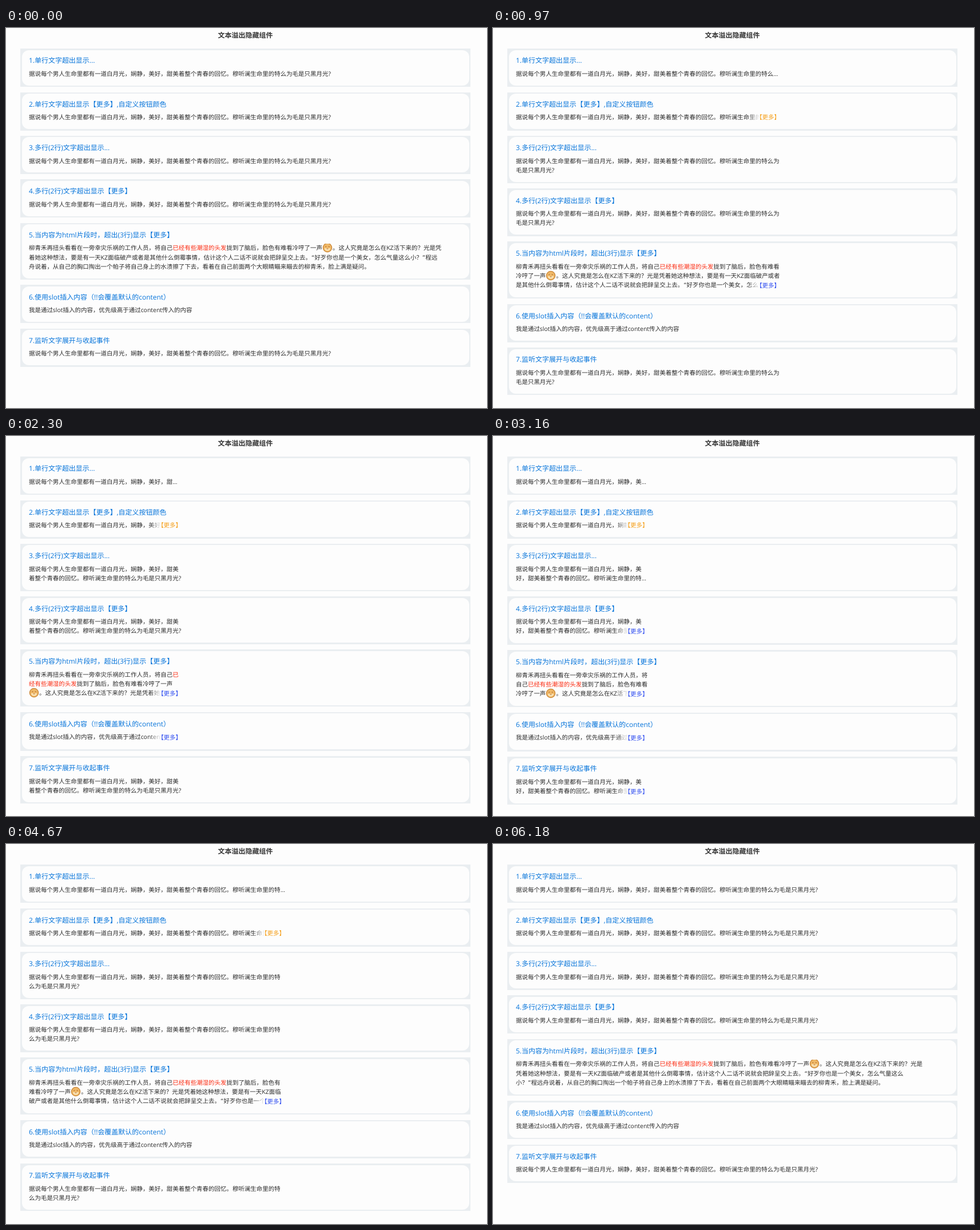
These frames come from a looping animation (841 px wide and 666 px high, 6.3 s). An HTML page:

```html
<!DOCTYPE html>
<html lang="zh-CN">
<head>
<meta charset="utf-8">
<title>文本溢出隐藏组件</title>
<style>
html, body { margin: 0; width: 100%; height: 100%; overflow: hidden; background: #fdfdfd; }
body {
  position: relative; color: #2c2c2c;
  font: 10.47px/16.2px "Open Sans", "Noto Sans CJK SC", "Noto Sans CJK", sans-serif;
  text-rendering: geometricPrecision; text-spacing-trim: space-all;
}
h1, h2, p { margin: 0; }
h1 { position: absolute; top: 4.6px; width: 837px; text-align: center; font-size: 12px; line-height: 16px; color: #333; }
main { position: absolute; left: 25px; top: 36.2px; width: 787px; }
section { padding: 2.5px; margin-bottom: 9.4px; background: #eaeef1; }
section > div { padding: 10.6px 12.5px 11.6px; border-radius: 12px; background: #fdfdfd; }
h2 { margin-bottom: 7.6px; font-size: 11.97px; font-weight: 400; line-height: 16px; color: #0674da; white-space: nowrap; }
.text { position: relative; width: var(--w); }
p { max-height: calc(var(--n) * 16.2px); overflow: hidden; }
.dots p { display: -webkit-box; -webkit-box-orient: vertical; -webkit-line-clamp: var(--n); }
.text i {
  display: none; position: absolute; right: 0; bottom: 0; padding-left: 15px;
  font-style: normal; white-space: nowrap; color: var(--c);
  background: linear-gradient(90deg, #fdfdfd00, #fdfdfd 38%);
}
.over i { display: block; }
.over.grow { padding-bottom: 1px; }
em { font-style: normal; color: #fb2a10; }
.quote { font-family: "DejaVu Sans", sans-serif; line-height: 0; }
svg { width: 18px; height: 18px; margin: -4px 0; vertical-align: -1px; }
#tip {
  position: absolute; top: 657px; width: 87px; height: 24px; padding-top: 2px; box-sizing: border-box;
  border: 1px solid #bdbdbd; border-radius: 5px; background: #fdfdfd;
  font-size: 11px; text-align: center; white-space: nowrap;
}
</style>
</head>
<body>
<h1>文本溢出隐藏组件</h1>
<main></main>
<div id="tip">iLuma Helper</div>
<script>
const LOOP = 6300, BEAT = 126, LEFT = 40, LINE = 16.2;
const blue = '#3350f0', orange = '#f5a01c';

const moon = '据说每个男人生命里都有一道白月光，娴静，美好，甜美着整个青春的回忆。穆听澜生命里的特么为毛是只黑月光?';
const face = `<svg viewBox="0 0 18 18"><circle cx="9" cy="9" r="7.6" fill="#f0b968" stroke="#c98434" stroke-width="1.3"/>
<path d="M4 10a5 4.500 0 0 0 10 0" fill="#fbe3b4"/><path d="M5 7h2.500M10.500 7h2.500M7.500 11h3" stroke="#a8652a"/></svg>`;
const story = `柳青禾再扭头看看在一旁幸灾乐祸的工作人员，将自己<em>已经有些潮湿的头发</em>拢到了脑后，脸色有难看冷哼了一声${face}&NoBreak;。这人究竟是怎么在KZ活下来的？光是凭着她这种想法，要是有一天KZ面临破产或者是其他什么倒霉事情，估计这个人二话不说就会把辞呈交上去。&NoBreak;“好歹你也是一个美女，怎么气量这么小？”&NoBreak;程远舟说着，从自己的胸口掏出一个帕子将自己身上的水渍擦了下去，看着在自己前面两个大眼睛瞄来瞄去的柳青禾，脸上满是疑问。`
  .replace(/[“”]/g, '<span class="quote">$&</span>');

// title, content, visible lines, colour of the button (none: ellipsis)
const cards = [
  ['1.单行文字超出显示...', moon, 1],
  ['2.单行文字超出显示【更多】,自定义按钮颜色', moon, 1, orange],
  ['3.多行(2行)文字超出显示...', moon, 2],
  ['4.多行(2行)文字超出显示【更多】', moon, 2, blue],
  ['5.当内容为html片段时，超出(3行)显示【更多】', story, 3, blue],
  ['6.使用slot插入内容（!!会覆盖默认的content）', '我是通过slot插入的内容，优先级高于通过content传入的内容', 1, blue],
  ['7.监听文字展开与收起事件', moon, 2, blue]
];

// key points of the drag: time, right edge of the text
const drag = [
  [0, 762.2], [710, 567], [970, 502], [1790, 353.5], [2300, 307], [2600, 285],
  [2870, 281], [3160, 271.5], [3420, 281], [3950, 310], [4070, 323.5], [4370, 385],
  [4670, 488], [4970, 575], [5240, 631], [5820, 717], [6180, 751.3]
];

// moves from key to key in equal steps of about one beat
function rightAt(t) {
  const i = drag.findLastIndex(([start]) => start <= t);
  const [t0, from] = drag[i];
  const [t1, to] = drag[i + 1] ?? [LOOP, from];
  const steps = Math.round((t1 - t0) / BEAT);
  return from + (to - from) * Math.floor((t - t0) / (t1 - t0) * steps) / steps;
}

const main = document.querySelector('main');
const tip = document.getElementById('tip');
main.innerHTML = cards.map(([title, body, n, color]) => `<section><div><h2>${title}</h2>
  <div class="text ${color ? '' : 'dots'} ${color === blue ? 'grow' : ''}" style="--n:${n};--c:${color}">
  <p>${body}</p>${color ? '<i>【更多】</i>' : ''}</div></div></section>`).join('');
const texts = [...document.querySelectorAll('.text')];

let shown;
function resize(right) {
  if (right === shown) return;
  shown = right;
  main.style.setProperty('--w', right - LEFT + 'px');
  texts.forEach((el, i) =>
    el.classList.toggle('over', el.firstElementChild.scrollHeight > cards[i][2] * LINE + 6));
}

function draw() {
  const t = performance.now() % LOOP;
  resize(rightAt(t));
  tip.style.display = t >= 3800 && t < 4520 ? '' : 'none';
  tip.style.left = (t < 3950 ? 766 : 742) + 'px';
  tip.style.opacity = t < 4370 ? 1 : 0.5;
  requestAnimationFrame(draw);
}
draw();
</script>
</body>
</html>
```
